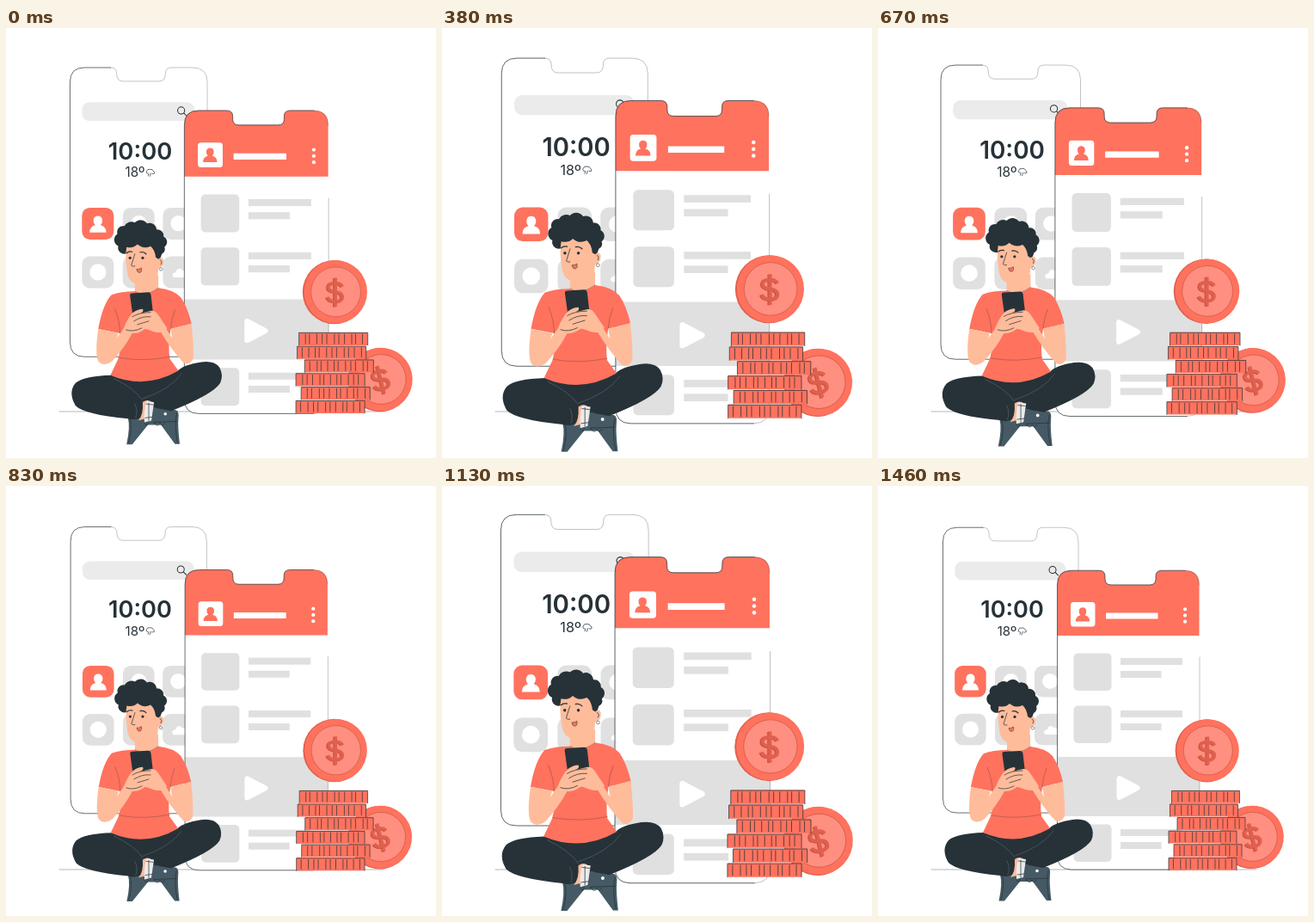
An HTML page that plays this animation: 500 by 500 pixels, repeating every 1500 ms.

```html
<!DOCTYPE html>
<html lang="en">
<head>
<meta charset="utf-8">
<title>Mobile phones and coins</title>
<style>
  html, body { margin: 0; height: 100%; overflow: hidden; background: #fff; }
  svg { display: block; width: 100vw; height: 100vh; }
  .ink { fill: none; stroke: #263238; stroke-width: .7; stroke-linecap: round; stroke-linejoin: round; }
  .faint { stroke-width: .4; stroke-opacity: .7; }
  .dark { fill: #263238; }
  .coral { fill: #ff725e; }
  .skin { fill: #ffbc9b; }
  .grey { fill: #e0e0e0; }
  .white { fill: #fff; }
  text { font-family: Inter, sans-serif; fill: #263238; text-anchor: middle; }
</style>
</head>
<body>
<svg viewBox="0 0 500 500">
  <defs>
    <path id="bust" d="M-9.500 10Q-9.500 3-3 1.500Q-5.500-1-5-5Q-4-9 0-9Q4-9 5-5Q5.500-1 3 1.500Q9.500 3 9.500 10Z"/>
    <path id="dollar" fill="none" stroke-width="3.600" d="M8-6Q6-10 0-10Q-8-10-8-5Q-8-1 0 0Q8 1 8 6Q8 11 0 11Q-7 11-9 6M0-16V17"/>
    <g id="coin">
      <circle cx="-.8" cy=".3" r="36.600" fill="#e0604f"/>
      <circle cx=".6" r="36.200" class="coral"/>
      <circle cx=".8" r="28.500" fill="#ff8f80" stroke="#c9513f" stroke-width=".6"/>
      <use href="#dollar" x="-.8" y=".5" stroke="#c9513f"/>
      <use href="#dollar" x=".4" stroke="#e0604f"/>
    </g>
  </defs>

  <path class="ink" stroke-opacity=".5" d="M62 446H440"/>

  <g data-center="154 214">
    <path class="white" d="M75.500 65Q75.500 48.300 92 48.300H122Q129 48.300 129 55Q129 64 136 64H178Q185 64 185 55Q185 48.300 192 48.300H216Q233 48.300 233 65V363Q233 380 216 380H92Q75.500 380 75.500 363Z"/>
    <path class="ink" d="M122 48.300H92Q75.500 48.300 75.500 65V363Q75.500 380 92 380H216"/>
    <path class="ink faint" d="M122 48.300Q129 48.300 129 55Q129 64 136 64H178Q185 64 185 55Q185 48.300 192 48.300H216Q233 48.300 233 65V363"/>
    <rect x="89.300" y="88" width="129" height="21.500" rx="8.500" fill="#ebebeb"/>
    <g class="ink" style="stroke-width:1"><circle cx="203" cy="97.500" r="4"/><path d="M206 100.500L209.500 104"/></g>
    <text x="156" y="153.500" font-size="27" font-weight="600">10:00</text>
    <text x="150" y="174" font-size="15" font-weight="400">18º</text>
    <path class="ink" d="M165 170Q162 169.500 163.500 167Q164 164.500 167 165Q170.500 164.500 171 167Q173.500 168 172 170H170M166 170L165 172.500M168.500 169.500L167 173"/>
    <g id="apps"></g>
    <use href="#bust" x="107.500" y="227.500" class="white"/>
    <circle cx="154.500" cy="227" r="9" class="white"/>
    <circle cx="200" cy="227" r="9" class="white"/>
    <circle cx="107.500" cy="283" r="9.500" class="white"/>
    <path class="white" d="M194 289Q191 284 197 283Q199 276 205 281Q211 281 211 289Z"/>
  </g>

  <g data-center="291 272">
    <path class="white" d="M208.500 115V429Q208.500 446 225 446H357Q374 446 374 429V115Z"/>
    <path class="coral" d="M208.500 174V115Q208.500 98.300 225 98.300H257Q264 98.300 264 105V108Q264 115 271 115H316Q323 115 323 108V105Q323 98.300 330 98.300H357Q373.500 98.300 373.500 115V174Z"/>
    <rect x="224" y="135" width="28.500" height="28.500" rx="3.500" class="white"/>
    <use href="#bust" class="coral" transform="translate(238 149) scale(.86)"/>
    <path class="white" d="M265 147.500h60.500v7h-60.500z"/>
    <g class="white"><circle cx="357" cy="143.300" r="2.100"/><circle cx="357" cy="150.500" r="2.100"/><circle cx="357" cy="157.700" r="2.100"/></g>
    <g id="posts" class="grey"></g>
    <path class="grey" d="M208.500 315H374V384H208.500Z"/>
    <path class="white" stroke="#fff" stroke-width="6" stroke-linejoin="round" d="M280.500 340V362L301.500 351Z"/>
    <path class="ink" d="M357 98.300H330Q323 98.300 323 105V108Q323 115 316 115H271Q264 115 264 108V105Q264 98.300 257 98.300H225Q208.500 98.300 208.500 115V429Q208.500 446 225 446H357"/>
    <path class="ink faint" d="M357 98.300Q373.500 98.300 373.500 115M374 199V429Q374 446 357 446"/>
  </g>

  <g data-center="405 358.500">
    <use href="#coin" transform="translate(435 408) rotate(-14)"/>
    <g id="stack"></g>
    <use href="#coin" transform="translate(383 307.500)"/>
  </g>

  <g data-center="164 354">
    <!-- shoes, ankle and sock -->
    <path fill="#455a64" d="M143 449L170 440L197 443Q201 444 200 452Q199 462 201.500 482H196L180 460H165L147 482.500H140.500Q145 462 142 452Z"/>
    <path class="ink" d="M144 451Q148 462 143 481M198 447Q195 460 199 481M161 458q4 6 4-1M172 457q4 7 7 1q2 5 5 0M172 457L198 456"/>
    <circle cx="185" cy="447.500" r="1.800" class="white"/>
    <!-- legs -->
    <path class="dark" d="M123 403Q91 404 82 412Q73 423 82 438Q92 448 142 453Q152 456 158 450L164 433Q172 432 170 440L192 444Q240 425 248 412Q252 403 247 394Q241 386 226 388Q206 391 199 398Q162 414 123 403Z"/>
    <path class="skin" d="M159 434Q165 430 169 434L165 452L154 455Q160 449 159 434Z"/>
    <path fill="#ebebeb" d="M163 433L172 434L169 455L161 457Q160 446 163 433Z"/>
    <path class="ink" d="M163 436l8 1M162 452l8-1M166 435v20"/>
    <path class="ink faint" style="stroke:#90a4ae" d="M126 407Q150 418 159 432M159 430Q190 420 204 401M150 436Q154 444 151 452"/>
    <!-- neck and shirt -->
    <path class="skin" d="M150 289H177V311Q163 318 150 310Z"/>
    <path class="coral" d="M150 307Q162 314 177 303Q195 305 203 314Q211 326 215 344L191 350Q188 372 190 384L200 398Q162 420 122 403L131 384Q135 370 133 355L108 350Q113 322 123 311Q134 307 150 307Z"/>
    <path class="ink faint" d="M127 327Q133 341 133 355M196 328Q192 338 191 350M132 383Q160 388 190 382M150 307Q162 314 177 303"/>
    <!-- arms -->
    <path class="skin" d="M108 350L131 355L129 361L146 337L166 346Q156 356 147 355Q138 372 124 387Q114 394 108 387Q104 378 108 350Z"/>
    <path class="skin" d="M215 344L191 350L193 361L176 334L159 346Q170 355 180 354Q192 374 206 389Q213 392 217 384Q218 376 215 344Z"/>
    <!-- handset and hands -->
    <path class="dark" d="M147 309L165 308Q168 308 168.500 311L171 333L148 337L144.500 312Q144 309 147 309Z"/>
    <path class="skin" d="M137 350Q141 338 148 331Q154 327 159 327Q161 330 156 332L169 329Q174 329 177 334L187 349Q183 355 175 353L158 349Q149 355 139 354Z"/>
    <path class="ink" d="M147 336Q155 331 168 331M149 341Q158 335 168 336M153 345L166 341M140 351Q148 354 158 349"/>
    <!-- head -->
    <path class="dark" d="M141 263A7 7 0 0 1 131 255A8 8 0 0 1 130 241A7 7 0 0 1 138 232A9 9 0 0 1 150 228A9 9 0 0 1 164 229A8 8 0 0 1 175 236A7 7 0 0 1 183 244A7 7 0 0 1 184 256A6 6 0 0 1 181 264L177 275H142Z"/>
    <path class="skin" d="M140.500 256Q148 258 153 253Q160 259 168 255Q173 259 174 268L177 270Q181 266 183 271Q184 279 177 281L176 291Q165 301 150 298Q142 295 141 283Q138.500 268 140.500 256Z"/>
    <path class="ink" style="stroke-width:1.200" d="M140.500 263Q143 260.500 147 261.500M156 262Q160 261 163 264"/>
    <path class="ink" d="M150 264L146 277Q148 279 150 278M179 271q3 1 1 5"/>
    <circle cx="144.500" cy="268.500" r="1.600" class="dark"/>
    <circle cx="159" cy="268.500" r="1.600" class="dark"/>
    <path class="coral" stroke="#263238" stroke-width=".5" d="M152 281.500Q155 282 157.500 280Q158.500 285.500 155 285.500Q152.500 285 152 281.500Z"/>
    <circle cx="180" cy="281.500" r="1.700" class="white" stroke="#263238" stroke-width=".5"/>
  </g>
</svg>
<script>
const $ = id => document.getElementById(id);
const rect = (x, y, w, h, rx = 0, cls = '') =>
  `<rect x="${x}" y="${y}" width="${w}" height="${h}" rx="${rx}" class="${cls}"/>`;

$('apps').innerHTML = [209, 264.8].map((y, row) => [89.2, 136, 182].map((x, col) =>
  rect(x, y, 36.5, 36.5, 9, row + col ? 'grey' : 'coral')).join('')).join('');

$('posts').innerHTML = [194.5, 255.5, 393.5].map(y =>
  rect(227.5, y, 44, 43.5, 5) + rect(282, y + 5.5, 72, 8) + rect(282, y + 20.5, 47.5, 8)).join('');

// Stacked coins: a milled edge with slightly uneven ticks
$('stack').innerHTML = [341.5, 339.5, 348, 338, 344, 338].map((x, row) => {
  const y = 354 + row * 15.6;
  let ticks = '';
  for (let i = 1; i < 12; i++) {
    const tx = x + i * 6.6 + Math.sin(i * 2.3 + row * 1.7) * 1.2;
    ticks += `M${tx} ${y + 2}v11`;
  }
  return rect(x, y, 79, 14.8, 1, 'coral') +
    `<path class="ink" d="M${x} ${y + 14.8}V${y + .4}H${x + 79}V${y + 14.8}${ticks}"/>`;
}).join('');

const PERIOD = 1500;
const groups = [...document.querySelectorAll('[data-center]')];

// Two beats per loop: up, slow down, up, down
function beat(p) {
  if (p < .2) return p / .2;
  if (p < .6) return (.6 - p) / .4;
  if (p < .8) return (p - .6) / .2;
  return (1 - p) / .2;
}

const start = performance.now();
function draw(now) {
  const time = Math.max(0, now - start);
  const scale = 1 + .1 * beat((time + 40) % PERIOD / PERIOD);
  for (const group of groups) {
    const [x, y] = group.dataset.center.split(' ');
    group.setAttribute('transform', `translate(${x} ${y}) scale(${scale}) translate(${-x} ${-y})`);
  }
  requestAnimationFrame(draw);
}
draw(start);
</script>
</body>
</html>
```
